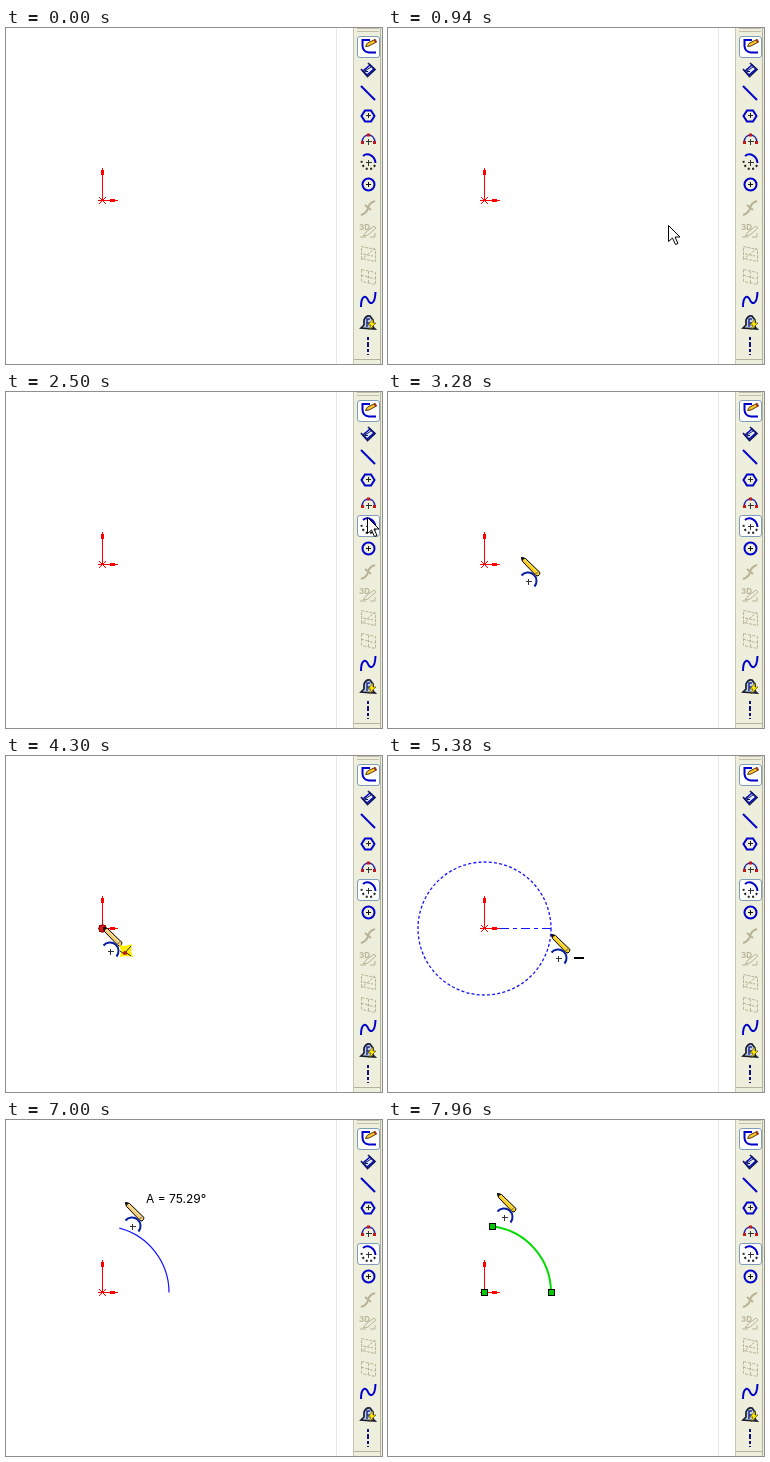
These frames come from a looping animation (376x336 px, 8 s). An HTML page:

```html
<!DOCTYPE html>
<html lang="en">
<head>
<meta charset="utf-8">
<title>Centerpoint arc</title>
<style>
html, body { margin: 0; width: 100%; height: 100%; overflow: hidden; background: #fff; }
svg { display: block; fill: none; }
text { font: 12px Inter, "Open Sans", sans-serif; fill: #000; }
.blue { stroke: #0000c8; }
.thin { stroke: #1414ff; }
.off { stroke: #b9b498; }
.crisp { shape-rendering: crispEdges; }
</style>
</head>
<body>
<svg width="376" height="336" viewBox="0 0 376 336">
  <defs>
    <g id="pencilBody">
      <path d="M.5 .5L4.500 1.500L19 15.500L18.500 17.500L17 19L15 18.500L1.500 4.500Z" stroke="#000"/>
      <path d="M4 3L16.500 15.500" stroke="#fff" stroke-opacity=".5"/>
      <path d="M0 0L4 1L1 4Z" fill="#111"/>
      <path d="M14.500 17L17 14.500" stroke="#555"/>
    </g>
    <path id="plus" d="M-3 0H3M0 -3V3" stroke="#333" class="crisp"/>
    <rect id="node" x="-3" y="-3" width="6" height="6" fill="#00c800" stroke="#000" class="crisp"/>
  </defs>

  <!-- window edge and toolbar -->
  <g class="crisp">
    <path d="M330.500 0V336" stroke="#e8e8e8"/>
    <rect x="347" y="0" width="29" height="336" fill="#eeeedc"/>
    <path d="M347.500 0V336" stroke="#c8c6b4"/>
    <path d="M374.500 0V336M348 331.500H375" stroke="#b4b2a0"/>
    <path d="M351 .5H373M351 3.500H373" stroke="#c0beaa"/>
  </g>
  <rect x="351.500" y="8.500" width="22" height="21" rx="2.500" fill="#fff" stroke="#7f9db9"/>
  <rect id="button" x="351.500" y="123.500" width="22" height="21" rx="2.500" fill="#fff"/>

  <!-- sketch, dimension, line, polygon -->
  <path d="M364 12H356.500V18Q357 24 363 24.500H370" class="blue" stroke-width="2"/>
  <path d="M359.500 18.500L361.500 15L369 11.500L370.500 14L363 18Z" fill="#fbc52c" stroke="#5a3a10"/>
  <path d="M368.500 11.500L370 14.500" stroke="#a03018" stroke-width="2"/>
  <path d="M357 43L364 37L368 41L361 47Z" fill="#e4ecff" class="blue" stroke-width="1.500"/>
  <path d="M355 41L361.500 48.500L369 41.500L362 35" stroke="#101860" stroke-width="1.700"/>
  <path d="M359 43L365 39M359 40.500V43.500H362" stroke="#101860"/>
  <path d="M355 58L369 72" class="blue" stroke-width="2"/>
  <path d="M359 82.500H365L368.500 88L365 93.500H359L355.500 88Z" class="blue" stroke-width="2"/>
  <path d="M360 87.500H365M362.500 85V90" stroke="#222" class="crisp"/>

  <!-- arcs and circle -->
  <path d="M356 114C357 104.500 368 104.500 369 114" stroke="#2020a8" stroke-width="1.500"/>
  <path d="M355 114.500H358M367 114.500H370M361 107H364" stroke="#c01818" stroke-width="3"/>
  <use href="#plus" x="362.500" y="113.500"/>
  <path d="M357 128C362 124 369 128 369.500 135" class="blue" stroke-width="2"/>
  <path d="M369 137C366 144 355 142 355.500 131" stroke="#222" stroke-width="2" stroke-dasharray="2 2.500"/>
  <use href="#plus" x="362.500" y="134.500"/>
  <circle cx="362.500" cy="156.500" r="6" class="blue" stroke-width="2"/>
  <path d="M360 156.500H365M362.500 154V159" stroke="#111" class="crisp"/>

  <!-- unavailable tools -->
  <g class="off">
    <path d="M355 187Q361 185 362 180T369 173M359 177L365 182" stroke-width="2"/>
    <path d="M357 208L360 204L368 198L370 200L362 207ZM354 209H360M364 209H369V205"/>
    <path d="M355.500 218.500L369.500 221.500V233.500L355.500 230.500ZM355 232L369 220M357 226L367 228" stroke-dasharray="3 1"/>
    <path d="M355.500 241.500L369.500 244.500V256.500L355.500 253.500ZM355 247L369 251M362.500 243V255" stroke-dasharray="3 1.500"/>
  </g>
  <text x="353" y="202" style="font-size:8px;font-weight:700;fill:#b9b498">3D</text>

  <!-- spline, mirror, centerline -->
  <path d="M355 279C355 267 360 267 362 272S369 277 369.500 264" class="blue" stroke-width="2"/>
  <path d="M355 300L358 297V292Q360 287 364 288L367 292V299L369 301Z" fill="#c4cfe4" stroke="#181c30" stroke-width="1.700"/>
  <path d="M361 299V291H364M361 295H364" stroke="#20308c" stroke-width="1.500"/>
  <path d="M367 291L362 297H365L363 302L370 295H367Z" fill="#ffe600" stroke="#4a4200" stroke-width=".6"/>
  <path d="M362 309V327" stroke="#101078" stroke-width="2" stroke-dasharray="3 2 5 2" class="crisp"/>

  <!-- drawing -->
  <g id="preview">
    <circle id="ring" cx="96.500" cy="172.500" class="thin" stroke-width="1.300" stroke-dasharray="3 2.200"/>
    <path id="radius" class="thin crisp" stroke-dasharray="9 4 4 4"/>
  </g>
  <path id="arc"/>
  <g stroke="#f00" class="crisp">
    <path d="M96.500 140V172.500H112M92 172.500H101"/>
    <path d="M93 169L100 176M93 176L100 169"/>
    <path d="M96.500 142V147M104 172.500H109" stroke-width="3"/>
  </g>
  <circle id="snap" cx="96.500" cy="172.500" r="3.700" fill="#e01818" stroke="#700"/>
  <g id="nodes">
    <use href="#node" x="96.500" y="172.500"/>
    <use href="#node" x="163.500" y="172.500"/>
    <use href="#node" x="104.500" y="106.500"/>
  </g>

  <!-- pointers -->
  <g id="pencil">
    <use id="body" href="#pencilBody"/>
    <path d="M.5 18.500A8 8 0 0 1 13.500 29.500" stroke="#0a1ea0" stroke-width="2"/>
    <use href="#plus" x="7.500" y="24.500"/>
    <g id="coincident">
      <path d="M16 18L22 19L29 17L28 24L30 30L23 29L17 30L18 24Z" fill="#ffee00"/>
      <path d="M17 24L21 27L28 19M22 25L28 29" stroke="#222"/>
      <circle cx="22" cy="26" r="2" fill="#c01010"/>
    </g>
    <path id="horizontal" d="M23 24H33" stroke="#000" stroke-width="2" class="crisp"/>
    <text id="label" x="21" y="1"></text>
  </g>
  <path id="arrow" d="M.5 .5V16.500L4.500 13L7.500 19.500L10 18.500L7 12H12Z" fill="#fff" stroke="#000"/>
</svg>

<script>
const $ = id => document.getElementById(id);
const LOOP = 8000, TICK = 60, START = 400;
const OX = 96.5, OY = 172.5, R = 66.5;

// pointer stops: time, x, y, and 1 when the move eases in and out
const stops = [
  [400, 166, 326], [1180, 330, 139], [1480, 348, 128], [1720, 357, 124],
  [1840, 357, 124], [2080, 361, 125], [2620, 361, 125], [3460, 102, 170, 1],
  [3760, 97, 171], [4300, 97, 171], [4960, 163, 178, 1], [5920, 163, 178],
  [6340, 162, 140], [6760, 136, 102], [7000, 119.26, 82], [7300, 108.5, 73], [8000, 108.5, 73]
];

function pointer(t) {
  const i = Math.max(1, stops.findIndex(s => s[0] >= t));
  const [t0, x0, y0] = stops[i - 1], [t1, x1, y1, eased] = stops[i];
  let k = Math.max(0, (t - t0) / (t1 - t0));
  if (eased) k = k * k * (3 - 2 * k);
  return [x0 + (x1 - x0) * k, y0 + (y1 - y0) * k];
}

const show = (id, on) => $(id).style.display = on ? '' : 'none';
const set = (id, attrs) => {
  for (const name in attrs) $(id).setAttribute(name, attrs[name]);
};

function draw(time) {
  const t = time < START ? 0 : START + Math.floor((time - START) / TICK) * TICK;
  const [x, y] = pointer(t);
  const place = `translate(${Math.round(x)} ${Math.round(y)})`;
  const sketching = t > 2620 && x < 345;
  const sizing = t > 4300 && t < 5980;
  const sweeping = t >= 5980;
  const done = t >= 7900;

  show('arrow', t >= START && !sketching);
  show('pencil', sketching);
  set('arrow', { transform: place });
  set('pencil', { transform: place });
  const pale = t >= 4300 && t < 5320 || sweeping && t < 7300;
  set('body', { fill: pale ? '#f6cc70' : '#f8cc18' });

  const pressed = t >= 2380;
  show('button', pressed || t >= START && x >= 351);
  set('button', { stroke: pressed ? '#7f9db9' : '#cfccbf' });

  const snapped = t >= 3700 && t <= 4300;
  show('snap', snapped);
  show('coincident', snapped);
  show('horizontal', sizing);

  show('preview', sizing);
  const r = Math.max(0, x - OX);
  set('ring', { r });
  set('radius', { d: `M112 ${OY}H${Math.max(112, OX + r)}` });

  const angle = Math.max(0, Math.atan2(OY - y, x + 1 - OX));
  const endX = OX + R * Math.cos(angle), endY = OY - R * Math.sin(angle);
  show('arc', sweeping);
  set('arc', {
    d: `M${OX + R} ${OY}A${R} ${R} 0 0 0 ${endX} ${endY}`,
    stroke: done ? '#00dc00' : '#1414ff',
    'stroke-width': done ? 2 : 1.2
  });
  show('nodes', done);

  show('label', sizing && t < 5380 || sweeping && !done);
  $('label').textContent = sweeping
    ? `A = ${(angle * 180 / Math.PI).toFixed(2)}°`
    : `R = ${r.toFixed(2)}`;
}

const begin = performance.now();
function frame() {
  draw((performance.now() - begin) % LOOP);
  requestAnimationFrame(frame);
}
frame();
</script>
</body>
</html>
```
